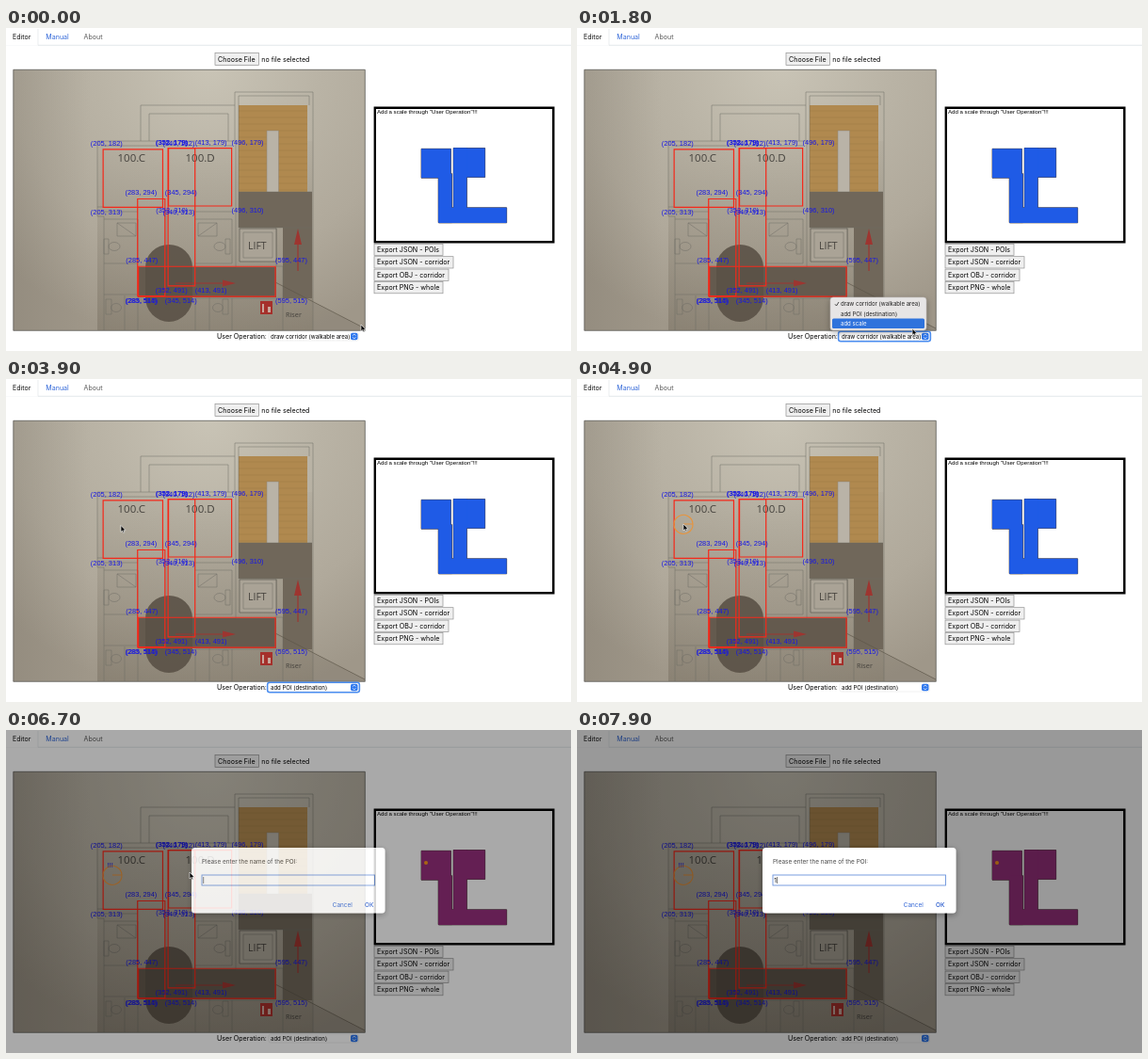
These frames come from a looping animation (600x343 px, 8000 ms). An HTML page:

```html
<!DOCTYPE html>
<html lang="en">
<head>
<meta charset="utf-8">
<title>Floor plan editor</title>
<style>
  html, body { margin: 0; width: 100%; height: 100%; overflow: hidden; background: #fff; }
  svg { display: block; width: 600px; height: 343px; font: 7.1px Inter, Roboto, sans-serif; }
  text { white-space: pre; }
  .small { font-size: 6.05px; }
  .dialog { font-size: 6.4px; }
  .label { font: 7.45px "Liberation Sans", Arial, sans-serif; fill: #1616e6; }
  .plan { font-family: "Open Sans", Lato, sans-serif; fill: #45423d; }
  .wall { fill: none; stroke: #6d6a63; stroke-width: .6; stroke-opacity: .8; }
  .button { fill: #efefef; stroke: #929292; stroke-width: .7; }
  .ring { fill: none; stroke: #4b8df0; stroke-width: 1.5; }
</style>
</head>
<body>
<svg id="stage" viewBox="0 0 600 343">
  <defs>
    <radialGradient id="wallLight" gradientUnits="userSpaceOnUse" cx="215" cy="40" r="300">
      <stop offset="0" stop-color="#c9c4b6"/>
      <stop offset=".4" stop-color="#b9b3a5"/>
      <stop offset=".7" stop-color="#b0a99b"/>
      <stop offset="1" stop-color="#9f9789"/>
    </radialGradient>
    <linearGradient id="sideShade">
      <stop offset="0" stop-color="#6f695e" stop-opacity=".22"/>
      <stop offset="1" stop-color="#6f695e" stop-opacity="0"/>
    </linearGradient>
    <linearGradient id="planShade" x2="0" y2="1">
      <stop offset="0" stop-color="#5c5344" stop-opacity=".04"/>
      <stop offset="1" stop-color="#5c5344" stop-opacity=".3"/>
    </linearGradient>
    <filter id="shadow" x="-20%" y="-30%" width="140%" height="170%">
      <feDropShadow dx="0" dy="2" stdDeviation="3" flood-opacity=".35"/>
    </filter>
    <clipPath id="photoClip"><path d="M8 44.5H381V321H8Z"/></clipPath>
  </defs>

  <!-- Tabs -->
  <path d="M0 18.3H600" stroke="#dee2e6" stroke-width=".8"/>
  <path d="M0 0H32Q34 0 34 2V18.8H0Z" fill="#fff"/>
  <path d="M34 1V18.3" stroke="#dee2e6" stroke-width=".6"/>
  <text x="7" y="11.7" fill="#111">Editor</text>
  <text x="42.3" y="11.7" fill="#2f66d8">Manual</text>
  <text x="82.5" y="11.7" fill="#5d5d5d">About</text>

  <!-- File chooser -->
  <rect class="button" x="222" y="26.5" width="46.5" height="13"/>
  <text x="225" y="35.6">Choose File</text>
  <text x="271.3" y="35.6">no file selected</text>

  <!-- Photographed plan -->
  <g clip-path="url(#photoClip)">
    <path d="M8 44H381V321H8Z" fill="url(#wallLight)"/>
    <path d="M8 44H90V321H8Z" fill="url(#sideShade)"/>
    <path d="M97 120H326V321H97Z" fill="url(#planShade)"/>
    <path d="M326 291L381 319V321H326Z" fill="#6b6559" opacity=".25"/>
    <path d="M247 82H320V174H247Z" fill="#b0894f"/>
    <path id="steps" stroke="#8d6b3e" stroke-width=".4" opacity=".7"/>
    <path d="M277 109H289.500V175H277Z" fill="#b9b3a7" stroke="#8d8578" stroke-width=".5"/>
    <path d="M247 174H325V287H294V212H247Z" fill="#70675a"/>
    <path d="M140 254H287V286H140Z" fill="#645a4e"/>
    <path d="M148 254a25 24 0 0 1 50 0V286a25 26 0 0 1-50 0Z" fill="#5a5146" opacity=".9"/>
    <path class="wall" d="M143 120V82H243V68H326V321M152 120V91H236V120M243 82V120M97 120H244V200M97 120V200H104V321M101 125H240M247 72H322V82M247 72V212H325M104 195H140M201 195H240M104 203H140V250H104M201 203H240V250H201M97 190H103M247 174H325M287 212V253H294V321M104 283H140V321M201 287V321M240 287V321M201 287H294M170 195V232M244 200V254H287"/>
    <g id="bath" class="wall">
      <path d="M118 207H138V221H118ZL138 221M104 224H109V240H104ZM126 284V321M106 288H112V304H106Z"/>
      <ellipse cx="115" cy="232" rx="6" ry="4.500"/>
      <ellipse cx="117" cy="297" rx="5.500" ry="4.500"/>
    </g>
    <use href="#bath" transform="translate(342) scale(-1 1)"/>
    <path d="M248 213H287V248H248Z" fill="#aaa396" stroke="#5d5952" stroke-width=".7"/>
    <path class="wall" d="M252 217H283V244H252Z"/>
    <path d="M286 270L381 319" stroke="#5d564a" stroke-width=".7"/>
    <path d="M180 271H231M310 258V229" stroke="#9d3530" stroke-width="1.2"/>
    <path d="M230 267.500L244 271L230 274.500ZM306 230L310 213L314 230Z" fill="#9d3530"/>
    <path d="M270 290H283V304H270Z" fill="#a5302b"/>
    <path d="M272 293H274V302H272ZM278 296H281V302H278Z" fill="#c9a79c"/>
    <g class="plan">
      <text x="118.500" y="142" font-size="11.500">100.C</text>
      <text x="190.500" y="142" font-size="11.500">100.D</text>
      <text x="257" y="235" font-size="10.500">LIFT</text>
      <text x="297" y="307" font-size="7.300">Riser</text>
    </g>
  </g>
  <path d="M7.800 44.300H381.300V321.300H7.800Z" fill="none" stroke="#55524c" stroke-width=".8"/>
  <g id="areas" fill="none" stroke="#f5281a" stroke-width="1.2"></g>
  <g id="labels" class="label"></g>
  <g id="poi">
    <path d="M113 154H123A10 10 0 1 1 122.990 153.800" fill="none" stroke="#e8943c" stroke-width="1.1"/>
    <text id="poiName" class="label" x="107.500" y="145.500">!!!</text>
  </g>

  <!-- Preview -->
  <path d="M391.800 84.800H581.300V227.200H391.800Z" fill="#fff" stroke="#000" stroke-width="2.400"/>
  <text x="394" y="91.400" style="font:6.100px 'Liberation Sans',Arial,sans-serif">Add a scale through "User Operation"!!!</text>
  <g id="outline" stroke="#4a3a35" stroke-width=".8"></g>
  <g id="shape"></g>
  <circle id="dot" cx="446" cy="141" r="2" fill="#ff9a1c"/>
  <g id="exports"></g>

  <!-- Operation select -->
  <text x="224" y="330">User Operation:</text>
  <rect x="279" y="323" width="95.500" height="9" rx="2" fill="#fff" stroke="#e3e3e3" stroke-width=".5"/>
  <rect id="focus" class="ring" x="277.600" y="322.200" width="97.800" height="10.600" rx="2.500"/>
  <text id="choice" class="small" x="281" y="329.900"></text>
  <rect x="366" y="323.700" width="7.500" height="7.600" rx="1.800" fill="#2f78ee"/>
  <path d="M368.200 326.600L369.750 325L371.300 326.600M368.200 328.400L369.750 330L371.300 328.400" fill="none" stroke="#fff" stroke-width=".8"/>
  <g id="menu" class="small">
    <rect x="269" y="286" width="102" height="35" rx="3" fill="#e7e5e5" stroke="#b5b3b3" stroke-width=".5" filter="url(#shadow)"/>
    <rect id="hover" x="271" width="98" height="10.300" rx="1.500" fill="#2f73dc"/>
    <path d="M274 293.300L275.500 295L278 291" fill="none" stroke="#222" stroke-width=".8"/>
  </g>

  <!-- Prompt -->
  <g id="prompt" class="dialog">
    <path d="M0 0H600V343H0Z" opacity=".4"/>
    <rect x="197" y="125" width="205.500" height="69.500" rx="3.500" fill="#fff" filter="url(#shadow)"/>
    <text x="208" y="141.700" fill="#484848">Please enter the name of the POI:</text>
    <rect class="ring" x="208" y="154" width="183.500" height="11" style="stroke:#6a93dc;stroke-width:.9"/>
    <text id="typed" x="209.300" y="161.900"></text>
    <path id="caret" d="M209.700 156V163" stroke="#222" stroke-width=".6"/>
    <text x="346.800" y="187.900" fill="#3367d6">Cancel</text>
    <text x="381" y="187.900" fill="#2558cc" font-weight="500">OK</text>
  </g>
  <path id="cursor" d="M0 0V7L1.600 5.600L2.700 8L3.800 7.500L2.800 5.200H5Z" stroke="#fff" stroke-width=".6"/>
</svg>
<script>
const $ = id => document.getElementById(id);
const LOOP = 8000;

// Walkable areas: left, top, right, bottom
const areas = [
  [205, 182, 340, 313],
  [353, 179, 496, 310],
  [283, 294, 345, 514],
  [352, 179, 413, 491],
  [285, 447, 595, 515]
].map(([l, t, r, b]) => [[l, t], [r, t], [r, b], [l, b]]);
const onPhoto = ([x, y]) => [7 + x * .469, 43.6 + y * .469];
const onPreview = ([x, y]) => [441 + (x - 205) * .2325, 128.3 + (y - 182) * .236];
const polygons = map => areas.map(a => `<polygon points="${a.map(map).join(' ')}"/>`).join('');

$('areas').innerHTML = polygons(onPhoto);
$('outline').innerHTML = $('shape').innerHTML = polygons(onPreview);
$('labels').innerHTML = areas.flatMap(a => a.map((p, i) => {
  const [x, y] = onPhoto(p);
  const left = i % 3 === 0, top = i < 2;
  return `<text x="${left ? x - 13.3 : x}" y="${top ? y - 4 : y + 7.3}">(${p.join(', ')})</text>`;
})).join('');

$('steps').setAttribute('d', Array.from({ length: 13 }, (_, i) => `M247 ${88 + i * 7}H320`).join(''));

$('exports').innerHTML = [['JSON - POIs', 73], ['JSON - corridor', 84], ['OBJ - corridor', 79], ['PNG - whole', 73]]
  .map(([name, w], i) => {
    const y = 229.3 + i * 13.4;
    return `<rect class="button" x="391" y="${y}" width="${w}" height="12.3"/>
      <text x="394" y="${y + 8.6}">Export ${name}</text>`;
  }).join('');

const options = ['draw corridor (walkable area)', 'add POI (destination)', 'add scale'];
$('menu').insertAdjacentHTML('beforeend',
  options.map((o, i) => `<text x="280" y="${295.4 + i * 10.3}">${o}</text>`).join(''));
const items = [...$('menu').querySelectorAll('text')];

// Cursor stops: time, x, y
const path = [
  [0, 377, 315], [200, 377, 315], [800, 366, 326], [1500, 366, 326], [2200, 341, 309],
  [2650, 341, 309], [2850, 338, 303], [3050, 338, 303], [3800, 122, 155.5], [4300, 122, 155.5],
  [4600, 113, 154], [5000, 113, 154], [5800, 195, 151], [LOOP, 195, 151]
];
function cursorAt(t) {
  const i = path.findIndex(p => p[0] > t);
  const [t0, x0, y0] = path[i - 1], [t1, x1, y1] = path[i];
  const k = (t - t0) / (t1 - t0), e = k * k * (3 - 2 * k);
  return [x0 + (x1 - x0) * e, y0 + (y1 - y0) * e];
}

const show = (id, on) => $(id).style.display = on ? '' : 'none';

function draw(now) {
  const t = now % LOOP;
  const [x, y] = cursorAt(t);
  const named = t >= 6500, typed = t >= 7500;

  $('cursor').setAttribute('transform', `translate(${x} ${y})`);
  show('cursor', !typed);

  const row = y > 320 ? -1 : y < 298 ? 0 : y < 308.5 ? 1 : 2;
  show('menu', t >= 1400 && t < 3000);
  show('hover', row >= 0);
  $('hover').setAttribute('y', 288 + row * 10.3);
  items.forEach((item, i) => item.setAttribute('fill', i === row ? '#fff' : '#222'));

  show('focus', t >= 1400 && t < 4700);
  $('choice').textContent = options[t < 3000 ? 0 : 1];

  show('poi', t >= 4700);
  show('poiName', named);
  show('dot', named);
  $('shape').setAttribute('fill', named ? '#98307d' : '#1f5be6');

  // The prompt fades in together with the dimmed page
  show('prompt', named);
  $('prompt').setAttribute('opacity', Math.max(0, Math.min(1, (t - 6500) / 240)));
  $('typed').textContent = typed ? '1' : '';
  $('caret').setAttribute('transform', `translate(${typed ? 2.9 : 0})`);
}

const start = performance.now();
function tick() {
  draw(performance.now() - start);
  requestAnimationFrame(tick);
}
tick();
</script>
</body>
</html>
```
